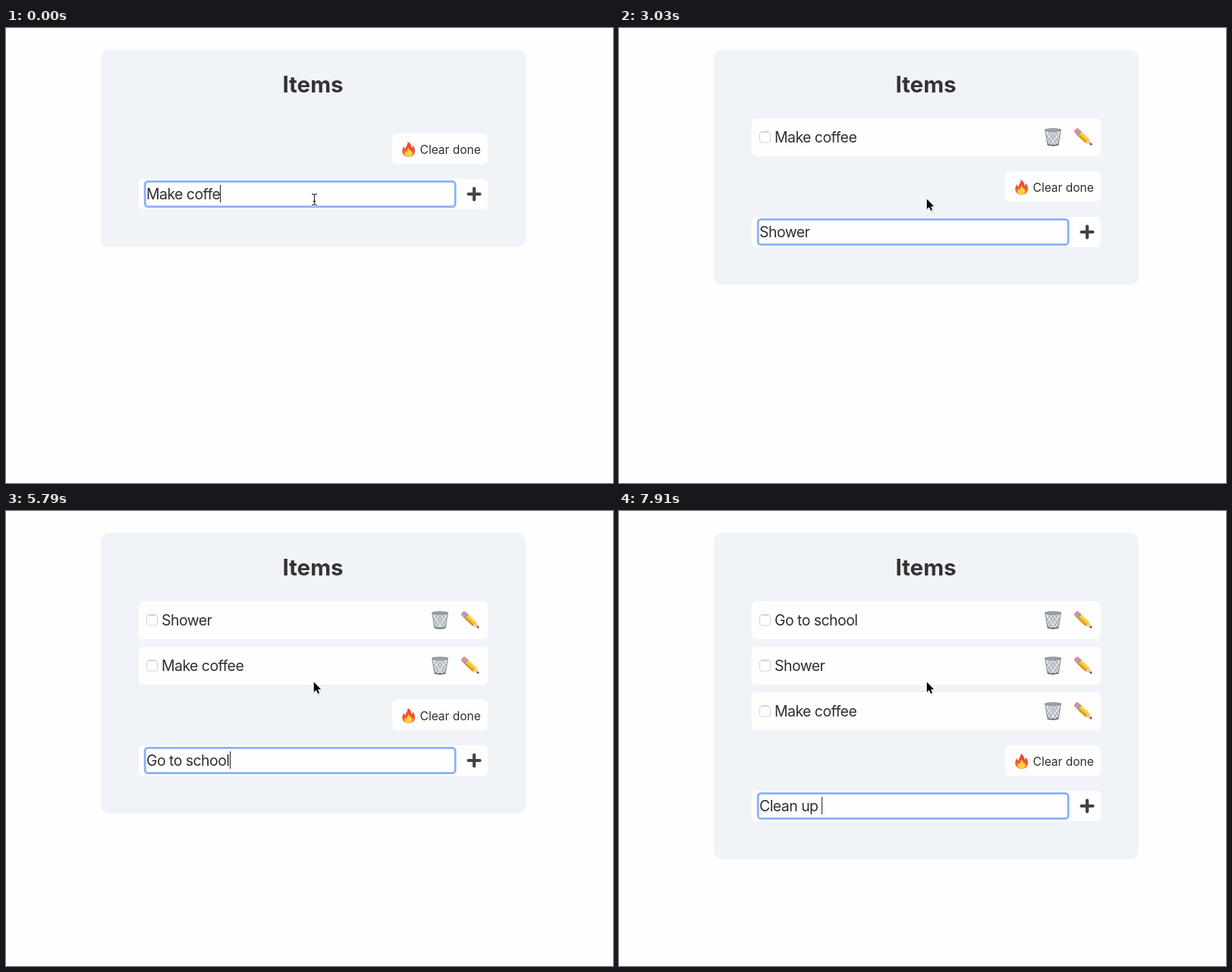
Recreate the animation shown at these times as an HTML page. Size 800 by 600 pixels, loop 8 s.

```html
<!DOCTYPE html>
<html lang="en">
<head>
<meta charset="utf-8">
<title>Items</title>
<style>
  html, body { margin: 0; width: 100%; height: 100%; overflow: hidden; background: #fefefe; }
  svg { display: block; }
  text {
    font: 19.4px Inter, "Liberation Sans", sans-serif;
    font-optical-sizing: none;
    letter-spacing: -0.5px;
    white-space: pre;
    fill: #2e2e2e;
  }
  .title { font-size: 29.5px; font-weight: 700; letter-spacing: 0; text-anchor: middle; fill: #333; }
  .label { font-size: 15.5px; letter-spacing: 0; }
  .hint { fill: #9c9ea9; }
  .box { fill: #fefefe; }
</style>
</head>
<body>
<svg width="800" height="600" viewBox="0 0 800 600">
  <defs>
    <linearGradient id="flame" x2="0" y2="1">
      <stop offset="0" stop-color="#e8432e"/>
      <stop offset=".55" stop-color="#f4572c"/>
      <stop offset="1" stop-color="#fb8a2c"/>
    </linearGradient>
    <g id="trash" fill="none">
      <path d="M561.8 15.5L564.8 35Q572 37.4 579.2 35L582.2 15.5Z" fill="#dde1e4" stroke="#7d868c"/>
      <path d="M565 17l13 18M569 17l10.5 14M574 17l6.500 8M563.500 23l9 13M564.500 30l4 6
               M579 17l-13 18M575 17l-10.500 14M570 17l-6.500 8M580.500 23l-9 13M579.500 30l-4 6"
            stroke="#8f989e" stroke-width=".8"/>
      <path d="M565 34.700Q572 36.700 579 34.700" stroke="#5f686e" stroke-width="1.500"/>
      <ellipse cx="572" cy="15.500" rx="10.600" ry="1.700" fill="#a4acb1" stroke="#717a80"/>
    </g>
    <g id="pencil" transform="translate(612.2 25) rotate(43)">
      <path d="M-10-3.600h-2.500q-2.300 0-2.300 2.300v2.600q0 2.300 2.300 2.300h2.500z" fill="#e58a95"/>
      <path d="M-10.300-3.700h3.600v7.400h-3.600z" fill="#a9b0b5"/>
      <path d="M-9.100-3.700v7.400M-7.600-3.700v7.400" stroke="#737c83" stroke-width=".6"/>
      <path d="M-6.700-3.700H7.500v7.400H-6.700z" fill="#f9bd2c"/>
      <path d="M-6.700-3.700H7.500v2.300H-6.700z" fill="#ffd95a"/>
      <path d="M-6.700 1.500H7.500v2.200H-6.700z" fill="#dd8f1d"/>
      <path d="M7.500-3.700L15.300 0L7.500 3.700Z" fill="#eecb9b"/>
      <path d="M12.300-1.500L15.600 0L12.300 1.500Z" fill="#3c3632"/>
    </g>
    <g id="row">
      <rect class="box" x="175" width="460" height="50" rx="6"/>
      <rect x="185.500" y="18" width="14" height="14" rx="3" fill="#fff" stroke="#d3d3d3"/>
      <path d="M188 18h9" stroke="#bdbdbd"/>
      <use href="#trash"/>
      <use href="#pencil"/>
    </g>
  </defs>

  <rect id="panel" x="125" y="29" width="560" height="260" rx="10" fill="#f0f4f9"/>
  <text class="title" x="404.500" y="85.300">Items</text>
  <g id="rows"></g>

  <g id="form">
    <rect class="box" x="509" y="139" width="126" height="40" rx="6"/>
    <path d="M529.300 150C533 151.800 534.700 155 534.400 158.200C535.700 157.400 536 156 535.900 154.800
             C538.500 157.500 539.300 160.400 539 163.300C538.600 167.500 535 170 530.700 170
             C526 170 522.400 167.200 522.200 162.800C522.100 160 523.300 157.700 524.800 156
             C524.900 157.800 525.500 159 526.600 159.600C526.400 155.800 530.300 154 529.300 150Z" fill="url(#flame)"/>
    <path d="M531 158C531 161 534.200 161.400 535.300 164C536.300 167 534 169.600 530.700 169.600
             C527 169.600 525 167.300 525.700 164.300C526.100 163 526.700 162.400 527.200 161.700
             C527.500 163 528.200 163.500 529 163.600C528.400 161.300 529.300 159.300 531 158Z" fill="#ffd04a"/>
    <text class="label" x="545.600" y="165.800">Clear done</text>

    <rect class="box" x="175" y="199" width="460" height="40" rx="6"/>
    <rect x="183.200" y="202.300" width="408.900" height="33.400" rx="4"
          fill="#fefefe" stroke="#8ab1f6" stroke-width="2.800"/>
    <text id="entry" x="185" y="226"></text>
    <rect id="caret" y="207" width="1" height="23" fill="#222"/>
    <path d="M609.500 219h15M617 211.500v15" stroke="#444" stroke-width="4.200" stroke-linecap="round"/>
  </g>

  <g id="beam" fill="none" stroke-linecap="round">
    <path id="stem" d="M403.500 218.900q2.600 0 3 1.700q.4-1.700 3-1.700M406.500 220.500v11.400
             M403.500 233.600q2.600 0 3-1.700q.4 1.700 3 1.700M404.800 228.500h3.400" stroke="#fff" stroke-width="2.400"/>
    <use href="#stem" stroke="#222"/>
    <path d="M403.500 218.900q2.600 0 3 1.700q.4-1.700 3-1.700M406.500 220.500v11.400
             M403.500 233.600q2.600 0 3-1.700q.4 1.700 3 1.700M404.800 228.500h3.400" stroke="#222" stroke-width="1.100"/>
  </g>
  <g id="arrow" stroke-linejoin="round">
    <path d="M405.500 226.500v15l3.500-3l2.400 5l2.800-1.200l-2.300-5h4.500z" fill="#000" opacity=".13"/>
    <path d="M405.700 225.400v13.600l3.100-2.900l2.100 4.700l2.100-.9l-2-4.600h4.200z" fill="#000"
          stroke="#fff" stroke-width="1.800" paint-order="stroke"/>
  </g>
</svg>

<script>
const LOOP = 8000;
const ARROW_AT = 890;
const HINT = 'What needs to be done?';

// Per item: when the field opens, when each key lands, when the caret blinks off.
const rounds = [
  { word: 'Make coffee', open: 0, preset: 10, keys: [270], off: [] },
  { word: 'Shower', open: 440, preset: 0,
    keys: [1070, 1420, 1780, 1870, 1960, 2580], off: [890, 2500, 3030] },
  { word: 'Go to school', open: 3300, preset: 0,
    keys: [4100, 4370, 4550, 4640, 4810, 4900, 4990, 5170, 5250, 5430, 5610, 5790], off: [3840] },
  { word: 'Clean up ', open: 6060, preset: 0,
    keys: [6420, 6690, 6780, 6860, 7480, 7570, 7650, 7830, 7910], off: [7400] }
];

const $ = id => document.getElementById(id);
const [panel, rowList, form, entry, caret, beam, arrow] =
  ['panel', 'rows', 'form', 'entry', 'caret', 'beam', 'arrow'].map($);
const show = (el, on) => el.setAttribute('visibility', on ? 'visible' : 'hidden');

const rows = [0, 1, 2].map(i => {
  const g = document.createElementNS('http://www.w3.org/2000/svg', 'g');
  g.setAttribute('transform', `translate(0 ${119 + 60 * i})`);
  g.innerHTML = '<use href="#row"/><text x="205" y="32"></text>';
  rowList.append(g);
  return g;
});

let shown = '';

function draw(t) {
  const done = rounds.filter(r => r.open <= t).length - 1;
  const { word, open, preset, keys, off } = rounds[done];
  const past = list => list.filter(k => k <= t);
  const typed = past(keys);
  const text = word.slice(0, preset + typed.length);
  const lit = Math.max(open, ...typed) > Math.max(-1, ...past(off));

  const state = [done, text, lit, t >= ARROW_AT].join('|');
  if (state === shown) return;
  shown = state;

  rows.forEach((row, i) => {
    show(row, i < done);
    row.lastChild.textContent = i < done ? rounds[done - 1 - i].word : '';
  });

  const shift = done ? 60 * done - 10 : 0;
  panel.setAttribute('height', 260 + shift);
  form.setAttribute('transform', `translate(0 ${shift})`);

  entry.textContent = text || HINT;
  entry.classList.toggle('hint', !text);
  caret.setAttribute('x', 185 + (text ? Math.round(entry.getComputedTextLength()) : 0));
  show(caret, lit);

  show(beam, t < ARROW_AT);
  show(arrow, t >= ARROW_AT);
}

const start = performance.now();
function tick() {
  draw((performance.now() - start) % LOOP);
  requestAnimationFrame(tick);
}
tick();
</script>
</body>
</html>
```
